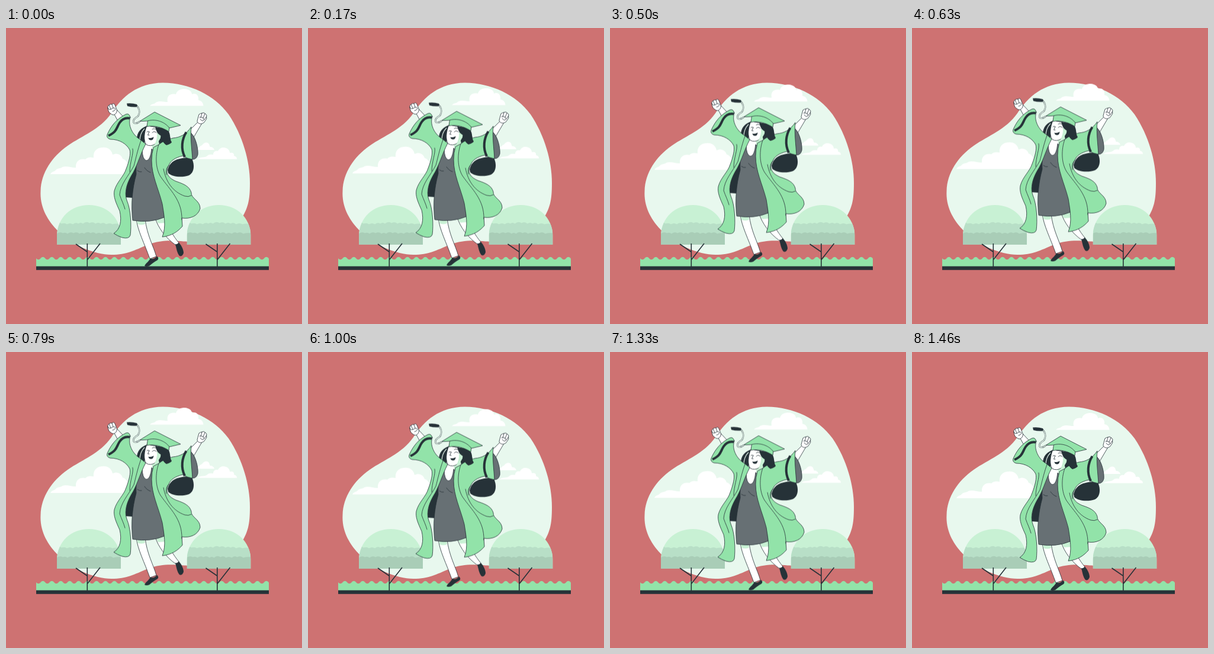
Animation, 500 px wide and 500 px high, one loop 1500 ms. Source, as an HTML page:

```html
<!DOCTYPE html>
<html lang="en">
<head>
<meta charset="utf-8">
<title>Graduation</title>
<style>
  html, body { margin: 0; height: 100%; overflow: hidden; background: #ce7272; }
  svg { display: block; width: 100vw; height: 100vh; }
  .float { animation: float 1.5s -30ms infinite; }
  @keyframes float {
    0%, 100% { transform: translateY(0); animation-timing-function: ease-in-out; }
    50% { transform: translateY(-9px); animation-timing-function: ease-in-out; }
  }
  .dark { fill: #263238; }
  .green { fill: #92e3a9; }
  .mint { fill: #c8f1d4; }
  .white { fill: #fff; }
  .grey { fill: #677074; }
  .ink { stroke: #263238; stroke-width: .8; stroke-linejoin: round; stroke-linecap: round; }
  .line { fill: none; }
  .stripe { fill: none; stroke: #263238; stroke-width: 4; }
  .branch { fill: none; stroke: #263238; stroke-width: 1.6; }
</style>
</head>
<body>
<svg viewBox="0 0 500 500">
  <defs>
    <clipPath id="dome">
      <path d="M86 366V350C87 320 110 299 140 299S193 320 194 350V366Z"/>
    </clipPath>
    <pattern id="blades" x="51" y="386" width="15.1" height="18" patternUnits="userSpaceOnUse">
      <path class="green" d="M0 3C2.500 6 5 6 7.550 3S12.600 0 15.100 3V18H0Z"/>
    </pattern>
    <path id="trunk" class="branch" d="M137.300 364V403M118 365L137 378M137 392L159 364"/>
    <g id="crown" clip-path="url(#dome)">
      <path class="mint" d="M86 298H195V367H86Z"/>
      <path fill="#b8dfc7" d="M86 331q4-3 8-.5q5-2 9 1q5-3 10 0q5-4 9-1q4-3 8 0q6-5 11-1q6-3 10 1q5-3 9 0q5-3 9 1q6-3 11 0q5-2 14 0V367H86Z"/>
      <path fill="#a9cdb7" d="M86 347q5-3 10-.5q4-2 8 1q5-4 10-1q6-3 10 1q4-3 8 0q5-5 11-1q5-3 9 1q5-3 10 0q4-4 9-1q6-3 10 1q6-2 13-1V367H86Z"/>
    </g>
    <path id="cord" d="M220 131C226 135 227 145 222 150C216 153 213 158 217 161Q221 162 226 158"/>
  </defs>

  <path fill="#e8f8ee" d="M265 92.500C310 93 352 113 376 146C400 182 412 225 412 262C412 292 409 304 396 325C376 352 330 362 300 360.500C285 359 262 357 240 366C215 376 205 383 178 383C150 383 108 366 85 340C68 322 57 300 58.500 275C59 245 78 217 104 199C130 181 158 172 178 144C196 116 222 93 265 92.500Z"/>

  <g class="float white">
    <path d="M75 247C77 242 82 243 84 240C88 236 92 238 95 235C102 232 109 236 118 236C117 224 126 220 134 222C139 217 144 219 148 219C147 206 156 202 163 202C171 201 178 205 180 214C188 210 195 214 197 221C204 222 209 234 211 247Z"/>
    <path d="M243 131.500C246 128 250 129 253 126C259 122 266 125 273 125C271 115 277 110 287 112C289 105 295 103 302 103C309 103.500 314 107 314 112C321 109 326 114 325 122C331 123 333 127 333.500 131.500Z"/>
    <path d="M323 221.500C328 217 335 220 340 216C343 213 347 214 350 214C350 208 355 207 358 208C361 202 367 201 372 203C377 205 378 209 378 211C383 210 386 212 385 216C389 217 390 219 390 221.500Z"/>
    <path d="M310 206C318 203 323 204 327 201C329 198 331 199 332 197C335 193 340 192 343 196C344 199 344 200 345 201C349 201 351 203 352 206Z"/>
  </g>

  <use href="#crown"/>
  <use href="#crown" x="219.500"/>
  <path fill="url(#blades)" d="M51 386H444V403H51Z"/>
  <use href="#trunk"/>
  <use href="#trunk" x="219.500"/>
  <path class="dark" d="M51 402.500H444V408.700H51Z"/>

  <g class="float">
    <!-- legs -->
    <path class="white ink" d="M252 321C257 338 270 355 287 367L292 363C283 352 276 341 268 320Z"/>
    <path class="mint" d="M253 323L268 320L271 329L257 330Z"/>
    <path class="dark" d="M286 365Q290 366 292 362.500C297 368 300 375 300 380Q298 387 293 385C289 380 288 373 286 365Z"/>
    <path class="white ink" d="M220 322C222 342 234 364 243 390L254 386C249 368 238 350 235 323Z"/>
    <path class="mint" d="M221 325H234L235 331Q228 334 222 331Z"/>
    <path class="dark" d="M234 402C236 397 241 395 244 389Q250 392 255 385.500Q259 389 256 392C250 395 246 399 242 402Q237 404 234 402Z"/>

    <!-- linings and hood -->
    <path class="dark" d="M224 222L205 258L201 286L215 287L224 245Z"/>
    <path class="dark" d="M273 240C277 224 290 219 313 219C318 227 320 243 309 249C298 253 281 252 274 245Z"/>

    <!-- arms -->
    <path class="white ink" d="M183 146L191 161L200 152L187 138Z"/>
    <path class="white ink" d="M172 135Q171 132 174 130.500Q176 128 179 129Q182 126 184 130L187.500 139Q187 145 182 147Q179 147 176 144Q173 143 172 135Z"/>
    <path class="line ink" d="M174 130.500L177 137M179 129L181 135M172 136Q175 139 178 137Q183 133 185 137Q183 141 180 141"/>
    <path class="white ink" d="M324 159L309 174L315 188L331 161Z"/>
    <path class="white ink" d="M324 153L326 146Q329 144 331 144Q335 142 336 145Q340 146 338.500 150Q340 153 337 156Q335 161 330 162Q324 162 323 158Z"/>
    <path class="line ink" d="M331 144L329 151M336 145L333 152M338.500 150L335 155M327 151Q330 150 333 152Q336 156 332 157Q329 156 328 154"/>

    <!-- hair behind -->
    <path class="dark" d="M240 165C228 168 221 176 221 188Q224 197 234 199L263 199Q273 200 280 194C276 187 279 178 269 171Z"/>
    <path fill="none" stroke="#e8f8ee" stroke-width="1.100" d="M234 170Q226 178 226 191"/>

    <!-- dress, neck -->
    <path class="white" d="M235 190L230 208Q231 224 238 224Q244 223 247 207L257 198L256 185Z"/>
    <path class="mint" d="M246 198L257 187L259 197L248 207Z"/>
    <path class="grey ink" d="M230 204Q230 222 237 224Q244 224 246 204L252 211C249 240 264 270 267 320Q243 330 214 325C211 298 213 273 220 247C219 232 221 216 230 204Z"/>
    <path class="line ink" d="M234 236Q238 242 244 244M222 241Q226 244 229 243"/>

    <!-- gown, left side -->
    <path class="green ink" d="M210 151C205 164 214 181 226 188L236 196C227 213 223 229 215 244C205 260 199 276 204 291C211 307 212 335 210 350Q208 357 196 354Q188 351 182 347C193 340 196 326 192 309C186 296 181 285 183 275C187 260 199 251 203 238C208 225 211 213 209 206C204 196 192 188 176 188Q169 186 171 180C178 164 188 153 202 146Q208 143 210 151Z"/>
    <path class="line ink" d="M228 190C222 207 219 222 216 233C207 250 193 264 192 282C195 291 199 298 201 306M214 204C216 212 209 227 209 243"/>
    <path class="stripe" d="M209 152.500C201 151 196 154 192 160C186 169 188 175 173 182"/>

    <!-- gown, right side -->
    <path class="grey ink" d="M313 178C320 184 325 203 324 214Q322 222 315 222C309 211 309 190 313 178Z"/>
    <path class="green ink" d="M258 197C268 189 276 188 282 186C294 185 304 180 313 167C311 184 314 204 315 222Q307 221 298 216C286 219 278 224 275 232C267 246 276 254 287 259C302 264 310 268 313 278C312 288 328 291 328 305C324 318 311 323 297 321L298 335C291 343 281 351 264 353C271 336 267 316 264 297C257 270 246 249 246 224Q246 212 249 202Z"/>
    <path class="line ink" d="M258 197C252 214 252 236 261 251C277 274 298 291 297 324M266 238C270 260 282 277 302 284Q308 286 313 283M275 232Q269 238 271 248"/>
    <path class="stripe" d="M304.500 176C297 188 295 204 302 218"/>

    <!-- face -->
    <path class="white ink" d="M238 165C233 177 232 190 237 197Q244 201 252 196L258 187Q262 180 257 169Z"/>
    <path class="mint" d="M255 177Q263 177 261 186Q257 194 250 199Q256 188 255 177Z"/>
    <path class="dark" d="M252 167C254 176 257 180 262 182C263 189 265 194 271 198Q278 196 280 193C275 186 280 178 271 170Z"/>
    <path class="line ink" d="M238 176Q240 173 242 176M247 177Q250 173 254 177M247 171Q250 169 253 171M242 175L239.500 181H242"/>
    <path class="dark" d="M240.500 185.500Q245 187 249.500 184Q249 189.500 245 189.500Q241 189.500 240.500 185.500Z"/>

    <!-- cap and tassel -->
    <path class="green ink" d="M240 152L238 166.500C251 164 264 168 275 175L277 160Z"/>
    <path class="green ink" d="M226 157.500L251 142L295 164.500L276 169C268 158 252 153 239 157Z"/>
    <use href="#cord" fill="none" stroke="#263238" stroke-width="2.300"/>
    <use href="#cord" fill="none" stroke="#e8f8ee" stroke-width="1.500"/>
    <path class="dark" d="M204 127.500Q213 126.500 221 129Q223 132 220 133.500Q212 134 205 132Z"/>
  </g>
</svg>
</body>
</html>
```
